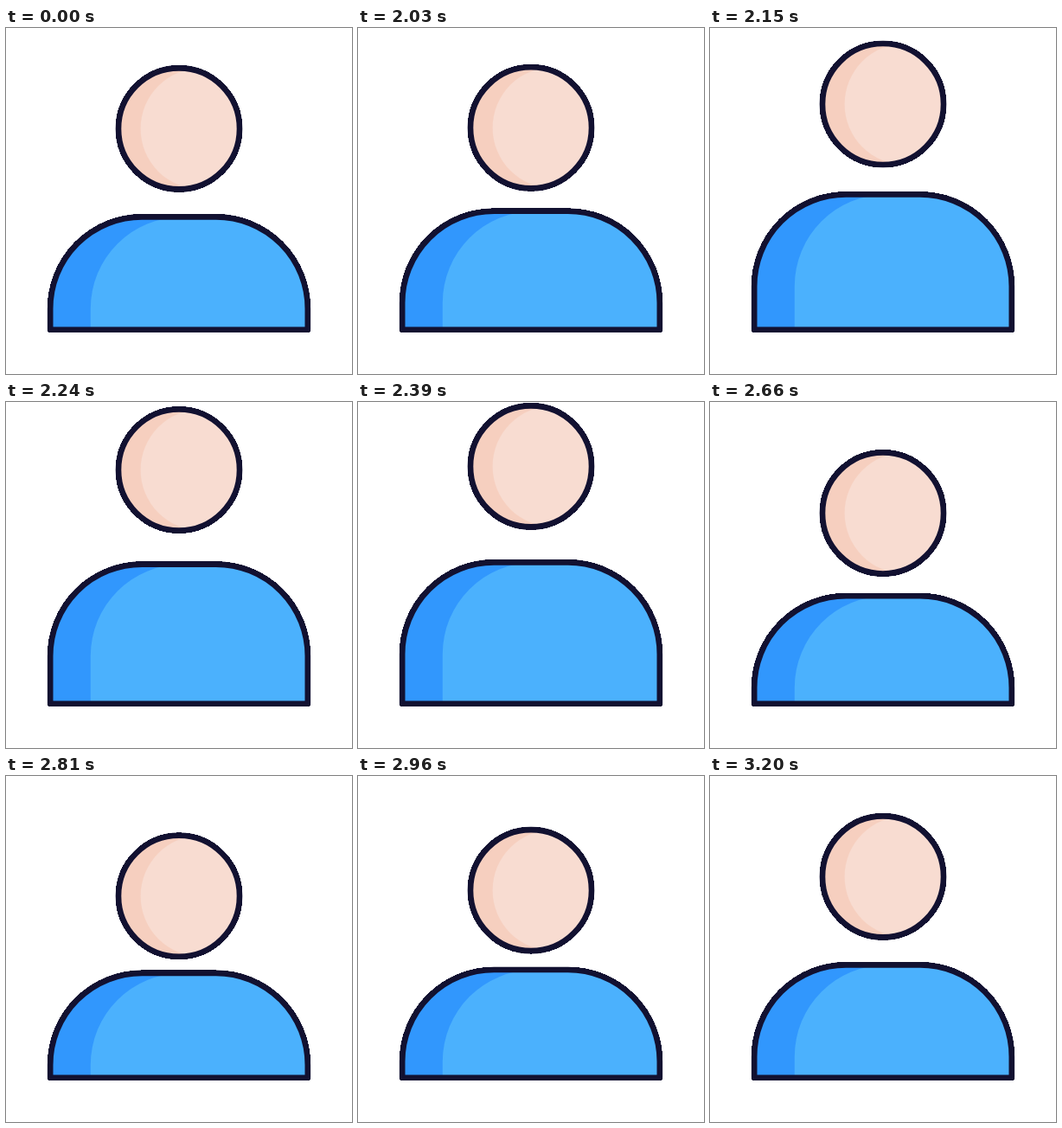
Animation, 400 px wide and 400 px high, one loop 3230 ms. Source, as an HTML page:

```html
<!DOCTYPE html>
<html lang="en">
<head>
<meta charset="utf-8">
<title>User icon</title>
<style>
  html, body { margin: 0; width: 100%; height: 100%; overflow: hidden; background: #fff; }
  svg { display: block; width: 100%; height: 100%; }
  .line, .rim { stroke: #121131; stroke-linejoin: round; }
  .line { fill: none; stroke-width: 6.6; }
  .rim { fill: #121131; stroke-width: 6.8; shape-rendering: crispEdges; }
</style>
</head>
<body>
<svg viewBox="0 0 400 400">
  <defs>
    <clipPath id="face"><circle cx="200" cy="116.4" r="70"/></clipPath>
    <clipPath id="torso"><path class="outline"/></clipPath>
  </defs>
  <g id="head">
    <circle class="rim" cx="200" cy="116.4" r="70"/>
    <circle cx="200" cy="116.4" r="70" fill="#f6cfbf"/>
    <circle cx="225.6" cy="116.4" r="70" fill="#f8dcd1" clip-path="url(#face)"/>
    <circle class="line" cx="200" cy="116.4" r="70"/>
  </g>
  <path class="outline rim"/>
  <path class="outline" fill="#3197fd"/>
  <g clip-path="url(#torso)"><path id="light" fill="#4bb1fd"/></g>
  <path class="outline line"/>
</svg>
<script>
const LOOP = 3230, START = 2000, STEP = 30, SPAN = 1200;

// Each key: progress, offset, easing of the segment that leads to it
const headKeys = [
  [0, 0],
  [1 / 3, -42, [.3, 0, .13, 1]],
  [2 / 3, 22.4, [.6, 0, .35, 1]],
  [1, 0, [.6, 0, .35, 1]]
];
const bodyKeys = [
  [0, 0],
  [1 / 3, -33, [.2, .5, .25, 1]],
  [2 / 3, 9.5, [.35, 0, .2, 1]],
  [1, 0, [.3, 0, .6, 1]]
];

const cubic = (a, b, u) => 3 * (1 - u) * (1 - u) * u * a + 3 * (1 - u) * u * u * b + u * u * u;

function ease([x1, y1, x2, y2], x) {
  let lo = 0, hi = 1;
  for (let i = 0; i < 24; i++) {
    const mid = (lo + hi) / 2;
    if (cubic(x1, x2, mid) < x) lo = mid; else hi = mid;
  }
  return cubic(y1, y2, (lo + hi) / 2);
}

function valueAt(keys, p) {
  if (p <= 0 || p >= 1) return 0;
  const i = keys.findIndex(k => k[0] > p);
  const [p0, v0] = keys[i - 1], [p1, v1, curve] = keys[i];
  return v0 + (v1 - v0) * ease(curve, (p - p0) / (p1 - p0));
}

// Shoulders with a fixed base and a top edge at y
function shoulders(left, right, y) {
  const r = 106, base = 348.8;
  return `M${left} ${base}V${y + r}A${r} ${r} 0 0 1 ${left + r} ${y}` +
    `H${right - r}A${r} ${r} 0 0 1 ${right} ${y + r}V${base}Z`;
}

const head = document.getElementById("head");
const light = document.getElementById("light");
const outlines = document.querySelectorAll(".outline");

function draw(time) {
  const t = time % LOOP;
  const p = Math.floor((t - START) / STEP) * STEP / SPAN;
  const top = 218.4 + valueAt(bodyKeys, p);
  head.setAttribute("transform", `translate(0 ${valueAt(headKeys, p)})`);
  outlines.forEach(el => el.setAttribute("d", shoulders(51.2, 348.8, top)));
  light.setAttribute("d", shoulders(97.8, 460, top));
}

const begin = performance.now();
function tick() {
  draw(performance.now() - begin);
  requestAnimationFrame(tick);
}
tick();
</script>
</body>
</html>
```
